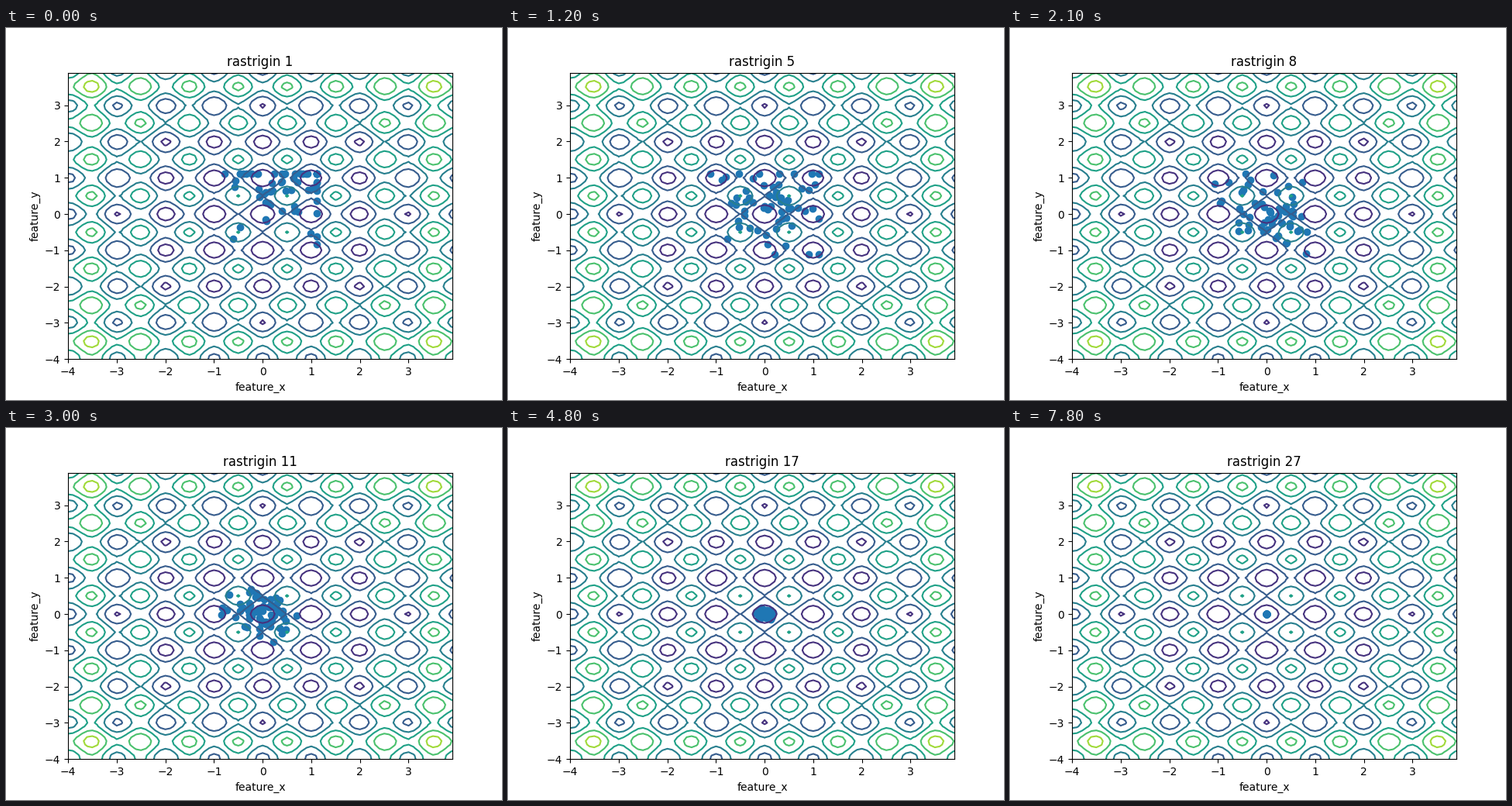
A matplotlib script for the animation above (8000 ms loop, 640x480 px).

```python
import numpy as np
import matplotlib.pyplot as plt
from matplotlib.animation import FuncAnimation

COUNT = 60        # particles in the swarm
BOUND = 1.12      # particles are held inside this square
TICKS = 3         # animation frames per generation
START_CENTRE = np.array([0.65, 0.75])

rng = np.random.default_rng(4)
home, swing = np.clip(rng.normal(size=(2, COUNT, 2)), -2.2, 2.2)
speed = rng.uniform(0.8, 2.4, (COUNT, 1))


def rastrigin(x, y):
    return 20 + x**2 + y**2 - 10 * (np.cos(2 * np.pi * x) + np.cos(2 * np.pi * y))


def swarm(generation):
    """Particles swing around a centre that drifts to the optimum."""
    age = generation - 1
    centre = START_CENTRE * np.exp(-age / 2.5)
    spread = 0.75 * np.exp(-(generation / 12) ** 2.3)
    offset = home * np.cos(speed * age) + swing * np.sin(speed * age)
    return np.clip(centre + spread * offset, -BOUND, BOUND)


fig, ax = plt.subplots(figsize=(6.4, 4.8), dpi=100)
axis = np.arange(-40, 40) / 10
X, Y = np.meshgrid(axis, axis)
ax.contour(X, Y, rastrigin(X, Y))
dots = ax.scatter(*swarm(1).T, color="tab:blue")
ax.set(xlim=(axis[0], axis[-1]), ylim=(axis[0], axis[-1]),
       xlabel="feature_x", ylabel="feature_y")
title = ax.set_title("rastrigin 1")


def update(frame):
    generation = frame // TICKS + 1
    dots.set_offsets(swarm(generation))
    title.set_text(f"rastrigin {generation}")
    return dots, title


anim = FuncAnimation(fig, update, frames=80, interval=100, repeat=True,
                     repeat_delay=0)
plt.show()
```
